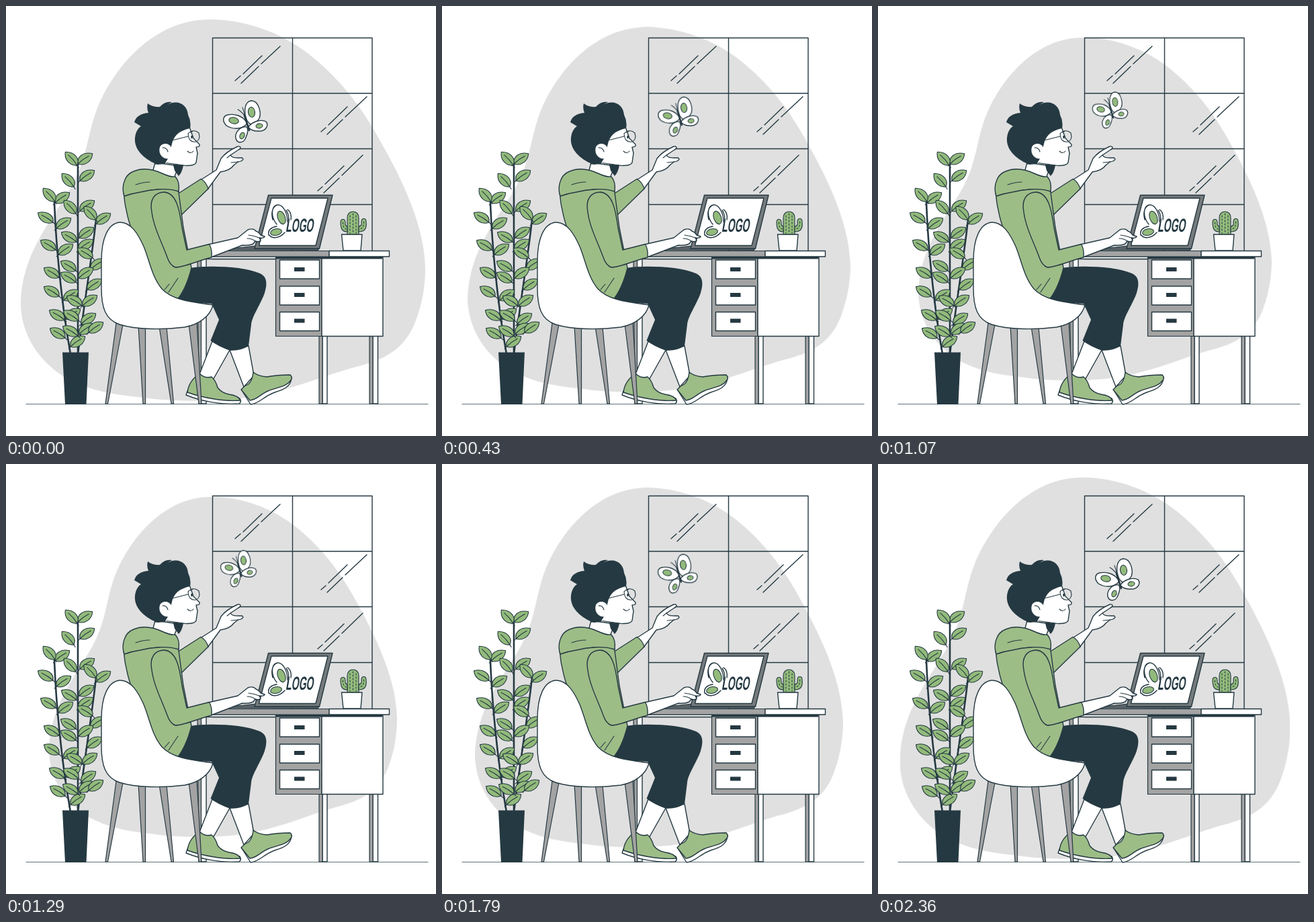
Recreate the animation shown at these times as an HTML page. Size 640 by 640 pixels, loop 2.43 s.

```html
<!DOCTYPE html>
<html lang="en">
<head>
<meta charset="utf-8">
<title>Designer at a desk</title>
<style>
  html, body { margin: 0; width: 100%; height: 100%; overflow: hidden; background: #fff; }
  svg { display: block; width: 100%; height: 100%; --ink: #253942; }
  svg * { stroke-linejoin: round; stroke-linecap: round; }
  .ln { fill: none; stroke: var(--ink); stroke-width: 1.4; }
  .thin { fill: none; stroke: var(--ink); stroke-width: 1.1; }
  .w { fill: #fff; stroke: var(--ink); stroke-width: 1.4; }
  .g { fill: #9dbd87; stroke: var(--ink); stroke-width: 1.4; }
  .leaf { fill: #92ba7b; stroke: var(--ink); stroke-width: 1.1; }
  .gray { fill: #a3a3a3; stroke: var(--ink); stroke-width: 1.2; }
  .k { fill: var(--ink); }
  .stem { fill: none; stroke: var(--ink); stroke-width: 2.6; }
  #blob { fill: #e0e0e0; transform-origin: 323px 286px; animation: breathe 2430ms infinite; }
  #moth { transform-origin: 356px 171.5px; animation: flit 2430ms infinite; }

  /* 34 even steps: shrink for 16, turn, grow for 16, then snap back */
  @keyframes breathe {
    0% { transform: scale(1, 1); animation-timing-function: steps(16); }
    47.0588% { transform: scale(.8545, .885); animation-timing-function: step-end; }
    50% { transform: scale(.8535, .885); animation-timing-function: steps(16); }
    97.0588% { transform: scale(.965, 1); animation-timing-function: step-end; }
    100% { transform: scale(1, 1); }
  }
  @keyframes flit {
    0% { transform: none; animation-timing-function: steps(16); }
    47.0588% { transform: translate(-12.3px, -19.3px) scale(.777, .85); animation-timing-function: step-end; }
    50% { transform: translate(-11px, -17.300px) scale(.8, .865); animation-timing-function: steps(16); }
    97.0588%, 100% { transform: none; animation-timing-function: step-end; }
  }
</style>
</head>
<body>
<svg viewBox="0 0 640 640">
  <defs>
    <g id="leaf">
      <path class="leaf" d="M0,0C4,-10 17,-11 26.500,-1C20,8 7,9 0,0Z"/>
      <path class="thin" d="M-4,1L0,0Q10,-2 20,-1"/>
    </g>
  </defs>

  <path id="blob" d="M303,20C225,20 166,83 138,147C122,184 122,222 101,262C77,309 22,365 22,443C22,490 52,534 94,556C130,574 160,578 205,583C246,589 318,590 369,581C430,570 473,550 521,537C563,527 595,510 610,468C620,441 624,417 624,390C623,337 600,279 566,217C544,177 514,121 450,71C407,38 354,20 303,20Z"/>

  <!-- window -->
  <path class="ln" d="M307.5,47.5H545V376.5H307.5ZM426.5,47.5V376M307.5,130H545M307.5,212.5H545M307.5,295.5H545"/>
  <path class="ln" d="M381,74L353,101M349,104L341,111M408,60L380,86M376,90L350,115
    M508,150L480,177M476,181L469,187M537,135L505,165M501,169L478,191
    M503,238L475,265M471,269L464,275M531,222L500,252M496,256L473,278"/>

  <!-- floor -->
  <path d="M30,592.5H628" fill="none" stroke="#5f7478" stroke-width="1.2"/>

  <!-- plant -->
  <g id="plant">
    <path class="stem" d="M107,236V518M72,292C74,350 82,440 96,518M134,317C130,360 118,430 107,518"/>
  </g>
  <path class="k" d="M84,515.5H123L119.5,593H88Z"/>

  <!-- desk -->
  <path class="w" d="M290,376H298V592H290Z"/>
  <path class="gray" d="M285,376H290.5V592H287Z"/>
  <path class="w" d="M285,373H402V376.5H285Z"/>
  <path class="w" d="M471,491H478V592H471ZM546,491H553.5V592H546Z"/>
  <path class="gray" d="M466,491H471V592H466ZM541,491H546V592H541Z"/>
  <path class="gray" d="M401.5,374H470V491.5H401.5Z"/>
  <path class="w" d="M470,374H561V491.5H470Z"/>
  <path class="w" d="M407.5,378H466.5V406H407.5ZM407.5,417H466.5V445H407.5ZM407.5,455.5H466.5V483.5H407.5Z"/>
  <path class="k" d="M429,389H444.5V395H429ZM429,427H444.5V433H429ZM429,465.5H444.5V471.5H429ZM402,373H560V376.5H402Z"/>
  <path class="gray" d="M300,364.5H481V373H300Z"/>
  <path class="w" d="M481,364.5H570.5V373H481Z"/>

  <!-- laptop -->
  <path d="M318,363L372,357H467L465,363Z" fill="#5c6366" stroke="#253942"/>
  <path d="M390.5,281.5H486L466.5,361H370Z" fill="#757a7c" stroke="#253942" stroke-width="1.4"/>
  <path class="w" d="M395,286H479L461,356.5H376.5Z"/>
  <g class="ln">
    <ellipse cx="410" cy="315" rx="5.5" ry="10" transform="rotate(-20 410 315)" class="leaf"/>
    <ellipse cx="402" cy="336.5" rx="8.5" ry="4.8" transform="rotate(-12 402 336.5)" class="leaf"/>
    <path d="M403,325C394,314 394,298 404,296C412,295 419,308 419,321M397,318C394,307 397,298 404,296M391,341C389,333 396,329 403,328M392,341C396,347 407,346 415,337"/>
    <path d="M417,304C422,311 422,321 418,335M419,303C424,306 425,313 424,318"/>
  </g>
  <text class="k" transform="matrix(.5 0 -.16 1 416 336)" font-family="'Liberation Sans', Arial, sans-serif" font-weight="700" font-size="28">LOGO</text>

  <!-- cactus -->
  <path class="leaf" d="M508,340V315C508,303 525,303 525,315V340Z"/>
  <path class="leaf" d="M508,336C500,336 498,331 498,322C498,316 505,316 505,322V325Q506,328 508,328ZM525,336C535,336 537,330 536,321C536,315 529,315 529,321V325Q528,328 525,328Z"/>
  <path d="M512,312V338M516.5,309V338M521,312V338M501.5,322Q501,331 507,332M532.5,321Q533,331 526,332" class="thin" stroke-dasharray="2 3"/>
  <path class="w" d="M499.5,340H530L528,364H502Z"/>

  <!-- butterfly -->
  <g id="moth">
    <path class="w" d="M358,173C352,163 340,160 330,162C322,164 322,172 328,178C338,184 350,184 358,176Z"/>
    <path class="w" d="M359,171C353,158 355,142 365,141C377,141 380,160 377,167C373,174 365,180 360,172Z"/>
    <path class="w" d="M361,180C366,172 380,168 387,172C391,177 388,184 380,186C372,187 365,185 361,181Z"/>
    <path class="w" d="M358,180C349,179 340,188 342,197C344,205 353,204 356,198C359,191 361,186 359,181Z"/>
    <ellipse class="leaf" cx="365.5" cy="158" rx="5" ry="7.5" transform="rotate(-8 365.5 158)"/>
    <ellipse class="leaf" cx="339" cy="170.5" rx="7.3" ry="4.6" transform="rotate(12 339 170.5)"/>
    <ellipse class="leaf" cx="377" cy="178.5" rx="5" ry="3.4" transform="rotate(-8 377 178.5)"/>
    <ellipse class="leaf" cx="351.5" cy="193" rx="3.3" ry="5" transform="rotate(25 351.5 193)"/>
    <path class="stem" d="M355,163L362,185"/>
    <path class="thin" d="M355,163Q349,156 345,154M355,163Q354,156 352,151"/>
  </g>

  <!-- raised arm -->
  <path class="w" d="M288,260L313,244L320,227C326,219 336,213 345,209C350,208 350,212 346,214L334,222C337,227 344,226 351,226C355,228 352,231 345,232L339,237C334,244 327,246 319,247L300,273Z"/>
  <path class="thin" d="M334,222L329,226M345,232L335,233"/>
  <path class="g" d="M255,280L290,257.5Q298,262 301,272L258,314Z"/>

  <!-- legs and shoes -->
  <path class="w" d="M307,499L288,548L306,560L333,512Z"/>
  <path class="w" d="M333,512L354,567L369,550L361,506Z"/>
  <path class="w" d="M270,573L268,579C290,588 320,594 347,592Q351,589 348,584Z"/>
  <path class="g" d="M288,547Q296,555 306,552Q312,557 315,568Q321,576 332,578Q346,580 349,587C325,589 292,583 270,575Q272,558 288,547Z"/>
  <path class="w" d="M351,572L364,593C377,592 383,581 400,575C413,571 424,567 425,553Z"/>
  <path class="g" d="M350,571L356,565Q366,563 368,545Q375,551 388,552Q404,549 423,549Q427,553 424,557C417,567 405,567 390,573C378,578 374,586 363,587Z"/>
  <path class="k" d="M250,440L274,390C300,386 352,387 378,398C389,403 389,414 385,427C379,444 366,462 365,474L361,506Q348,514 333,512.5Q316,507 304.5,498L317,467L306,443Z"/>

  <!-- torso -->
  <path class="g" d="M175,277C177,304 184,325 191,345L225,420Q238,434 254,438Q268,422 276,390L264,330L256,270Z"/>
  <path class="w" d="M222,233L218,248Q234,256 250,256L257,238Z"/>
  <path class="k" d="M248,233L264,237Q262,248 257,253L251,245Z"/>
  <path class="g" d="M176,283C172,272 174,252 190,246C204,240 219,243 232,249Q245,255 252,254Q259,262 257,276C240,270 215,273 200,277Q187,279 176,283Z"/>
  <path class="thin" d="M193,266Q204,262 214,262M236,422L243,414M242,426L256,405"/>

  <!-- typing arm -->
  <path class="w" d="M301,355L345,345L360,333Q368,330 372,335Q377,337 379,341L385,343Q384,346 377,345L379,349Q377,352 371,350L368,354Q361,357 352,356L305,374Z"/>
  <path class="thin" d="M361,341Q370,342 377,345M359,346Q366,346 371,350"/>
  <path class="g" d="M217,307C213,287 222,277 236,277C253,279 258,300 262,330L269,363L302.5,354.5Q307,362 306,374C286,379 265,389 252,389Q244,386 240,374C232,352 220,330 217,307Z"/>

  <!-- head -->
  <path class="w" d="M238,196L273,180L279,197L288,206Q289,210 283,210L285,219L283,233Q281,238 268,237.5L240,233L222,235Z"/>
  <path class="k" d="M226,236C207,229 190,214 192,196C193,187 197,181 201,179L191,173C193,165 200,160 212,159Q209,152 211,145Q218,151 229,150Q237,141 247,143L240,147C256,138 270,147 271,162Q276,172 274,182C260,185 253,190 248,201L241,229L236,235Z"/>
  <path fill="#fff" d="M246,211C243,203 230,203 228.5,212C227,222 235,229 243,227Z"/>
  <path fill="#fff" d="M246,211L241,227L237,234L268,237.5L275,220L270,199L250,201Z"/>
  <path class="thin" d="M233,211Q239,210 241,217M239,233.5L268,237.5"/>
  <path class="thin" d="M247,200L271,194M271,190Q279,182 287,189Q290,199 283,202Q272,204 271,190M270,216Q275,221 279,216M274,188L279,186"/>
  <ellipse class="k" cx="276.5" cy="195" rx="1.4" ry="2.2"/>

  <!-- chair -->
  <path class="gray" d="M164,472L174,474L151.5,592H148ZM197,476H207.5V592H204ZM228,477L239,478L249.5,592H246ZM272,473L284,470L291,592H287Z"/>
  <path class="w" d="M142,380C142,345 152,324 169,322C186,321 197,340 205,358C214,380 217,403 232,421C249,439 281,441 308,445C304,462 287,474 266,478C234,482 194,482 169,474C148,467 142,449 142,420Z"/>
</svg>
<script>
  // leaf bases on the right and left of each stem
  const right = [[107,235],[110,260],[73,293],[110,305],[134,324],[75,331],[109,345],[78,370],[108,363],
    [126,392],[108,405],[121,422],[86,438],[114,446],[89,466],[112,473],[109,488],[123,486],[96,507]];
  const left = [[106,237],[101,269],[73,291],[104,309],[134,318],[70,322],[105,351],[74,363],[129,375],
    [104,394],[79,404],[104,411],[79,432],[113,446],[87,467],[108,468],[88,494],[107,491]];
  const plant = document.getElementById('plant');
  const addLeaf = (x, y, turn) => {
    const u = document.createElementNS('http://www.w3.org/2000/svg', 'use');
    u.setAttribute('href', '#leaf');
    u.setAttribute('transform', `translate(${x} ${y}) ${turn}`);
    plant.append(u);
  };
  right.forEach(([x, y]) => addLeaf(x, y, 'rotate(-33)'));
  left.forEach(([x, y], i) => addLeaf(x, y, `scale(-1 1) rotate(${i < 5 ? -46 : -30})`));
</script>
</body>
</html>
```
